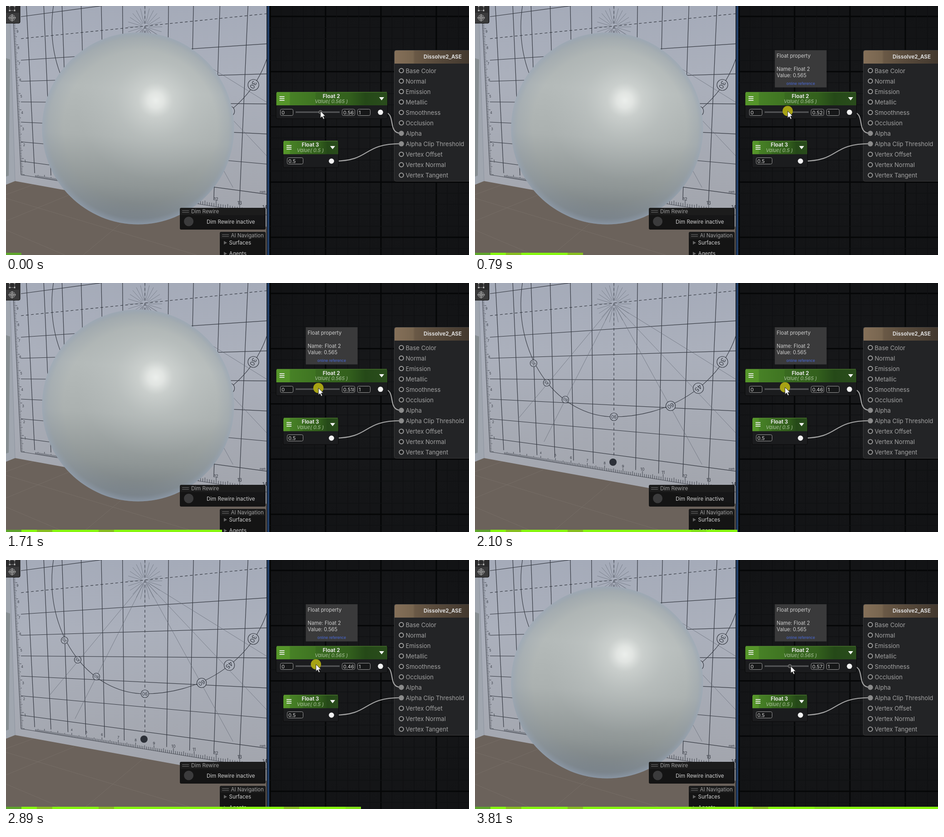
An HTML page with a canvas for the animation above (3.94 s loop, 1020x549 px).

```html
<!DOCTYPE html>
<html>
<head>
<meta charset="utf-8">
<style>
html, body { margin: 0; width: 100%; height: 100%; overflow: hidden; background: #101113; }
canvas { display: block; }
</style>
</head>
<body>
<canvas id="stage" width="1020" height="549"></canvas>
<script>
const c = document.getElementById('stage').getContext('2d');
const TAU = Math.PI * 2;
const LOOP = 3940;
const INK = '#343841';

// Slider value at each step of the drag
const values = [.565, .538, .482, .455, .452, .484, .524, .548, .566, .574, .569, .557, .542, .518, .478,
  .454, .463, .507, .534, .552, .546, .516, .462, .452, .464, .486, .513, .542, .563, .573];
const starts = values.map((_, i) => 130 * i + 10 * [1, 10, 16, 23].filter(k => i > k).length);

function rect(x, y, w, h, fill, radius = 0, stroke) {
  c.beginPath();
  c.roundRect(x, y, w, h, radius);
  paint(fill, stroke);
}
function paint(fill, stroke, width = 1) {
  if (fill) { c.fillStyle = fill; c.fill(); }
  if (stroke) { c.strokeStyle = stroke; c.lineWidth = width; c.stroke(); }
}
function disc(x, y, r, fill, stroke, width) {
  c.beginPath();
  c.arc(x, y, r, 0, TAU);
  paint(fill, stroke, width);
}
function poly(points, fill, stroke) {
  c.beginPath();
  points.forEach(([x, y]) => c.lineTo(x, y));
  c.closePath();
  paint(fill, stroke);
}
function line(x1, y1, x2, y2, color = INK, width = 1, dash = []) {
  c.beginPath();
  c.setLineDash(dash);
  c.moveTo(x1, y1);
  c.lineTo(x2, y2);
  paint(null, color, width);
  c.setLineDash([]);
}
function text(s, x, y, size, color, align = 'left', style = '') {
  c.font = `${style} ${size}px Inter, sans-serif`;
  c.fillStyle = color;
  c.textAlign = align;
  c.fillText(s, x, y);
}
function blend(gradient, stops) {
  stops.forEach(([at, color]) => gradient.addColorStop(at, color));
  return gradient;
}
function clipTo(x, y, w, h, draw) {
  c.save();
  c.beginPath();
  c.rect(x, y, w, h);
  c.clip();
  draw();
  c.restore();
}

// Horizontal place of a bottom ruler mark
function rulerX(mark) {
  const u = mark - 8.5;
  return 305.5 + 40.4 * u / (1 - .0292 * u);
}

function drawWall() {
  rect(0, 0, 575, 549, blend(c.createLinearGradient(0, 0, 0, 440),
    [[0, '#a5abb9'], [.35, '#abb0bc'], [1, '#a3a6ae']]));
  poly([[0, 0], [8, 0], [20, 386], [0, 394]], '#a0a6af');
  poly([[0, 115], [9, 118], [6, 374], [0, 376]], '#868d91');
  line(8, 0, 20, 386, '#8d949f');
  poly([[20, 386], [575, 487], [575, 549], [0, 549], [0, 394]], '#6b625b');
  [[150, 412, 0, 474], [300, 440, 170, 549], [60, 394, 0, 416], [0, 424, 420, 549], [0, 494, 130, 549]]
    .forEach(p => line(...p, '#7a726b', .7));

  // Perspective grid
  for (let j = -1; j < 7; j++) {
    line(33, 72 + 48 * j - .5 * j * j, 574, 17 + 66.3 * j, INK, 1.2, j ? [] : [6, 5]);
  }
  for (let k = -6; k < 5; k++) {
    const dx = 50.6 * k / (1 - .02715 * k);
    const end = k ? 405 + .14 * dx : 383;
    line(306 + dx, 0, 306 + dx * (1 - .00019 * end), end, INK, 1.2, k ? [] : [6, 5]);
  }
  for (let i = 0; i < 24; i++) {
    const a = i * TAU / 24;
    line(306 + 8 * Math.cos(a), 46 + 8 * Math.sin(a), 306 + 38 * Math.cos(a), 46 + 42 * Math.sin(a), '#69707b', .7);
  }
  [[97, 297], [152, 350], [500, 400], [574, 212], [574, 330]]
    .forEach(([x, y]) => line(306, 46, x, y, '#636974', .7));

  // Protractor arc
  c.beginPath();
  c.ellipse(306, 46, 280, 249, 0, -.3, TAU / 4);
  c.ellipse(306, 46, 205, 249, 0, TAU / 4, TAU / 2 + .4);
  paint(null, INK, 1.1);
  [[545, 174, 12, 30], [492, 232, 11.5, 45], [431, 271, 10.5, 60], [306, 295, 8.5, 90],
   [199, 257, 7.5, 60], [158, 220, 7.5, 45], [129, 177, 7.5, 30]].forEach(([x, y, r, label]) => {
    disc(x, y, r, '#abb0bb', INK, 1.2);
    c.save();
    c.translate(x, y);
    c.rotate(Math.atan2(y - 46, x - 306) + TAU / 4);
    text(label, 0, r * .42, r * 1.15, INK, 'center');
    c.restore();
  });

  // Rulers
  line(33, 372, 14.5, 0, INK, .8);
  line(33, 372, 574, 461, INK, .8);
  for (let i = 0; i <= 103; i++) {
    const y = 372 - i * 3.58, x = 33 - (372 - y) * .05;
    line(x, y, x + (i % 10 ? i % 5 ? 4 : 6 : 8), y, INK, .8);
  }
  for (let i = 1; i < 10; i++) text(i, 44 - i * 2.1, 381 - i * 35.8, 7, INK, 'center');
  for (let i = 13; i <= 143; i++) {
    const x = rulerX(i / 10);
    if (x < 33 || x > 574) continue;
    const y = 413.5 + .165 * (x - 285), size = .6 + x / 700;
    line(x, y, x, y - (i % 10 ? i % 5 ? 6 : 8 : 11) * size, INK, .9);
  }
  for (let i = 4; i < 15; i++) {
    const x = rulerX(i);
    text(i, x, 400 + .165 * (x - 285), 5 + x / 110, INK, 'center');
  }
  text('mark', 559, 412, 5.5, INK);
  disc(304, 395, 8, '#2c3038');
}

function drawSphere() {
  const x = 291, y = 270, r = 211.5;
  disc(x, y, r, blend(c.createLinearGradient(305, 58, 275, 482),
    [[0, '#a5acac'], [.3, '#b4bab9'], [.55, '#abb1b0'], [.8, '#8f9696'], [1, '#70787d']]));
  disc(x, y, r, blend(c.createRadialGradient(330, 208, 0, 330, 208, 175),
    [[0, 'rgba(238,241,238,.95)'], [.1, 'rgba(233,236,233,.85)'], [.22, 'rgba(218,222,219,.6)'],
     [.5, 'rgba(205,210,208,.3)'], [1, 'rgba(190,196,196,0)']]));
  disc(x, y, r, blend(c.createRadialGradient(x + 5, y - 3, r * .8, x, y, r),
    [[0, 'rgba(140,153,170,0)'], [.7, 'rgba(140,153,170,.25)'], [1, 'rgba(150,164,183,.65)']]));
}

function drawOverlays() {
  rect(-4, -4, 35, 42, '#2b2b2c', 3, '#151515');
  rect(0, 15, 29, 22, '#3a3a3b');
  c.setLineDash([2, 1.5]);
  rect(8, 0, 11, 10, null, 0, '#c4c4c4');
  c.setLineDash([]);
  [[8, 0], [19, 0], [8, 10], [19, 10]].forEach(([x, y]) => rect(x - 1.5, y - 1.5, 3, 3, '#c4c4c4'));
  disc(13.5, 26, 6.5, null, '#bbb');
  line(5, 26, 22, 26, '#bbb');
  line(13.5, 18, 13.5, 34, '#bbb');
  rect(10.5, 23, 6, 6, null, 0, '#bbb');

  const grip = (x, y) => [0, 4].forEach(d => line(x, y + d, x + 15, y + d, '#777'));
  rect(383, 445, 189, 48, 'rgba(17,17,17,.96)', 3);
  rect(384, 446, 187, 15, '#1c1c1c', 2);
  grip(388, 451);
  text('Dim Rewire', 408, 457, 11.5, '#a0a0a0');
  disc(402.5, 475, 10.5, '#3b3b3c');
  text('Dim Rewire inactive', 442, 480, 11.5, '#d2d2d2');

  rect(471, 498, 101, 60, 'rgba(17,17,17,.96)', 3);
  rect(472, 499, 99, 14, '#1c1c1c', 2);
  grip(476, 504);
  text('AI Navigation', 495.5, 510, 11.5, '#a0a0a0');
  ['Surfaces', 'Agents'].forEach((label, i) => {
    const y = 522 + 24 * i;
    poly([[480, y - 4], [487, y], [480, y + 4]], '#666');
    text(label, 491.5, y + 4, 11.5, '#d2d2d2');
  });
}

function drawField(value, x, y, w) {
  rect(x + .5, y + .5, w - 1, 14, '#161718', 3, '#9c9c9c');
  clipTo(x + 2, y, w - 4, 15, () => text(value, x + 3, y + 11.5, 11, '#d8d8d8'));
}

function drawFloatNode(title, value, x, y, w) {
  rect(x + .5, y + .5, w - 1, 59, '#1b1c1e', 3, '#090909');
  rect(x + 1, y + 1, w - 2, 29, blend(c.createLinearGradient(x, 0, x + w, 0),
    [[0, '#57982b'], [.12, '#549329'], [.13, '#478126'], [.35, '#3f7422'], [.36, '#396a20'], [.65, '#33601d'],
     [.8, '#254918'], [1, '#2a4c1c']]), [3, 3, 0, 0]);
  line(x + 2, y + 1, x + w - 2, y + 1, '#6aa544', .8);
  [11, 15, 19].forEach(d => line(x + 8, y + d, x + 19, y + d, '#eee', 1.8));
  poly([[x + w - 19, y + 12], [x + w - 8, y + 12], [x + w - 13.5, y + 19]], '#fff');
  text(title, x + w / 2 - 1, y + 13.5, 11.5, '#e6e6e6', 'center', 'bold');
  text(`Value( ${value} )`, x + w / 2 - 1, y + 25, 11, '#a9c19b', 'center', 'italic');
  disc(x + w - 16, y + 45.3, 5.8, '#f2f2f2');
}

function drawWire(x1, y1, x2, y2, c1, c2) {
  c.beginPath();
  c.moveTo(x1, y1);
  c.bezierCurveTo(c1, y1, c2, y2, x2, y2);
  paint(null, '#a6a6a6', 2.2);
}

function drawGraph() {
  rect(574, 0, 446, 549, blend(c.createRadialGradient(800, 275, 60, 800, 275, 380),
    [[0, '#17181a'], [1, '#111214']]));
  for (let i = -5; i < 22; i++) {
    const major = i % 5 === 0, color = major ? '#050607' : '#0f1012', width = major ? 3 : 1.2;
    const x = 704 + i * 24.4, y = 23 + i * 24.35;
    if (x > 580) line(x, 0, x, 549, color, width);
    line(580, y, 1020, y, color, width);
  }
  rect(574, 0, 2, 549, '#15171b');
  rect(575.5, 0, 4.5, 549, '#223f68');

  rect(855.5, 97.5, 180, 289, '#232426', 4, '#3a3a3b');
  rect(856, 98, 180, 29, blend(c.createLinearGradient(856, 0, 1020, 0),
    [[0, '#857059'], [.25, '#77654f'], [.27, '#6a5946'], [.55, '#594b3c'], [1, '#43392f']]), [4, 4, 0, 0]);
  text('Dissolve2_ASE', 962, 116, 11.5, '#dcdcdc', 'center', 'bold');
  drawWire(831, 234, 871, 281, 862, 838);
  drawWire(722, 342, 871, 303.5, 805, 783);
  ['Base Color', 'Normal', 'Emission', 'Metallic', 'Smoothness', 'Occlusion', 'Alpha', 'Alpha Clip Threshold',
   'Vertex Offset', 'Vertex Normal', 'Vertex Tangent'].forEach((label, i) => {
    const y = 142.5 + 23.05 * i, linked = i === 6 || i === 7;
    disc(871, y, 4.7, linked ? '#8b8b8b' : '#1a1b1c', linked ? '#8b8b8b' : '#9a9a9a', 2.1);
    text(label, 880.5, y + 5, 13.1, '#a3a3a3');
  });

  drawFloatNode('Float 2', '0.565', 594.5, 189, 246.5);
  drawField('0', 604, 227, 29);
  drawField('1', 774, 227, 29);
  line(638, 234, 735, 234, '#57585a', 3);
  drawFloatNode('Float 3', '0.5', 610, 296.7, 123);
  drawField('0.5', 619, 334, 36);
}

function drawTooltip() {
  rect(660.5, 97.5, 114, 82, '#3a3a3b');
  text('Float property', 664.5, 113.5, 11.2, '#cfcfcf');
  text('Name: Float 2', 664.5, 142.5, 11.2, '#cfcfcf');
  text('Value: 0.565', 664.5, 156.5, 11.2, '#cfcfcf');
  text('online reference', 717.5, 174, 8.2, '#4a6bdc', 'center');
}

function drawDrag(step) {
  const value = values[step], x = 638 + 97 * value;
  const last = step === values.length - 1;
  const tipX = x + (last ? 2 : 0), tipY = last ? 234 : step < 16 ? 231.5 : 230;
  drawField(value.toFixed(3), 740, 227, 29);
  disc(x, 234, 3.6, '#3a3b3c', '#7b7b7b', 1.4);
  if (step && !last) disc(tipX, tipY, 11.3, 'rgba(174,170,20,.95)');
  const arrow = [[0, 0], [0, 15.5], [3.6, 12.2], [6.2, 18], [8.7, 16.9], [6.2, 11.3], [11, 11.2]];
  poly(arrow.map(([dx, dy]) => [tipX + dx, tipY + dy]), '#fff', '#222');
}

function drawProgress(step) {
  for (let i = 0; i <= step; i++) {
    const color = i === 0 ? '#5fa42c' : [2, 6, 18].includes(i) ? '#86bd20' : [14, 22].includes(i) ? '#80e018' : '#86f60f';
    rect(34 * i, 544, 34, 5, color);
  }
}

function draw(step) {
  clipTo(0, 0, 574, 549, () => {
    drawWall();
    if (values[step] > .5) drawSphere();
    drawOverlays();
  });
  drawGraph();
  if (step) drawTooltip();
  drawDrag(step);
  drawProgress(step);
}

let shown = -1;
function tick() {
  const time = performance.now() % LOOP;
  const step = starts.filter(s => s <= time).length - 1;
  if (step !== shown) draw(shown = step);
  requestAnimationFrame(tick);
}
tick();
</script>
</body>
</html>
```
